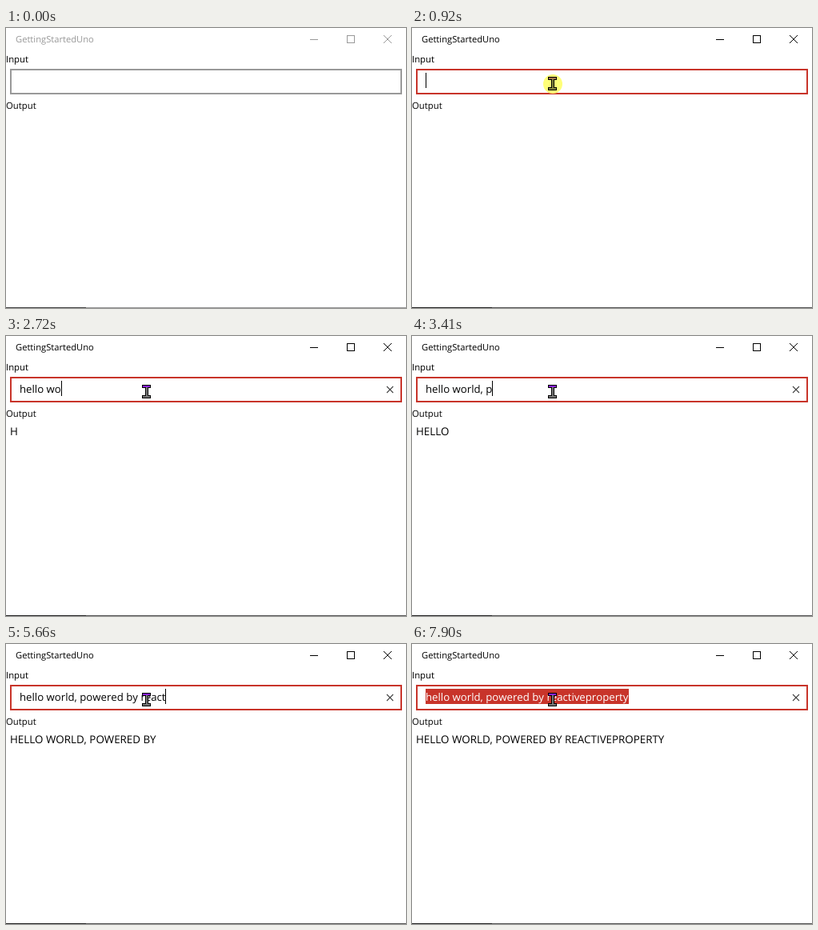
Recreate the animation shown at these times as an HTML page with a canvas. Size 500 by 350 pixels, loop 8000 ms.

```html
<!DOCTYPE html>
<html lang="en">
<head>
<meta charset="utf-8">
<title>GettingStartedUno</title>
<style>
  html, body { margin: 0; width: 100%; height: 100%; overflow: hidden; background: #fff; }
  canvas { display: block; width: 500px; height: 350px; }
</style>
</head>
<body>
<canvas id="stage" width="500" height="350"></canvas>
<script>
const ctx = document.getElementById('stage').getContext('2d');
const LOOP = 8000;
const MESSAGE = 'hello world, powered by reactiveproperty';
const ACCENT = '#c8342a';
const FAMILY = '"Open Sans", "Noto Sans", sans-serif';

// Moments in ms
const MOVE_START = 140, MOVE_STEP = 76.6, MOVE_STEPS = 6;
const FOCUS = 920, CLICK_END = 1070, SELECT_ALL = 7280;
const ECHO_DELAY = 1010;

// Typing rhythm: [letter index, ms], an even pace in between
const RHYTHM = [[0, 1700], [6, 2550], [13, 3410], [19, 4250], [22, 4645], [28, 5580], [32, 6115], [39, 6885]];

function typedAt(t) {
  if (t < RHYTHM[0][1]) return '';
  const next = RHYTHM.findIndex(([, time]) => time > t);
  if (next < 0) return MESSAGE;
  const [i0, t0] = RHYTHM[next - 1], [i1, t1] = RHYTHM[next];
  const index = i0 + (i1 - i0) * (t - t0) / (t1 - t0);
  return MESSAGE.slice(0, Math.floor(index + 1e-6) + 1);
}

function rect(color, x, y, w, h) {
  ctx.fillStyle = color;
  ctx.fillRect(x, y, w, h);
}

function label(str, x, y, size, color = '#000') {
  ctx.font = `${size}px ${FAMILY}`;
  ctx.fillStyle = color;
  ctx.fillText(str, x, y);
}

function cross(x, y, r, color, width) {
  ctx.strokeStyle = color;
  ctx.lineWidth = width;
  ctx.beginPath();
  ctx.moveTo(x - r, y - r); ctx.lineTo(x + r, y + r);
  ctx.moveTo(x + r, y - r); ctx.lineTo(x - r, y + r);
  ctx.stroke();
}

function drawWindow(focused) {
  const ink = focused ? '#000' : '#999';
  rect('#fff', 0, 0, 500, 350);
  label('GettingStartedUno', 12, 18, 11.2, ink);
  rect(ink, 380, 14, 10, 1);
  ctx.strokeStyle = ink;
  ctx.lineWidth = 1;
  ctx.strokeRect(426.5, 9.5, 9, 9);
  cross(477, 14, 5, ink, 1);
  rect(focused ? '#555' : '#999', 0, 349, 500, 1);
  rect(focused ? '#222' : '#444', 0, 349, 100, 1);
  label('Input', 0, 43, 11.3);
  label('Output', 0, 101, 11.35);
}

function drawField(t, hovered) {
  const focused = t >= FOCUS;
  ctx.strokeStyle = focused ? ACCENT : hovered ? '#666' : '#999';
  ctx.lineWidth = 2;
  ctx.strokeRect(6, 52, 488, 30);
  if (!focused) return;

  const str = typedAt(t);
  const selected = t >= SELECT_ALL;
  ctx.font = `13.2px ${FAMILY}`;
  const end = 17 + Math.round(ctx.measureText(str).width);
  if (selected) rect(ACCENT, 17, 56, end - 17 + 1, 19);
  label(str, 17, 71, 13.2, selected ? '#fff' : '#000');
  if (!selected) rect('#000', end, 56, 1, 19);
  if (str) cross(480, 67, 4, '#444', 1.1);
}

function drawArrow(x, y) {
  const outline = [[0, 0], [0, 16], [4, 12.5], [6.5, 18.5], [9, 17.5], [6.5, 11.5], [11.5, 11.5]];
  ctx.beginPath();
  for (const [dx, dy] of outline) ctx.lineTo(x + dx + .5, y + dy + .5);
  ctx.closePath();
  ctx.fillStyle = '#fff';
  ctx.fill();
  ctx.strokeStyle = '#000';
  ctx.lineWidth = 1;
  ctx.stroke();
}

function drawBeam(x, y, clicking) {
  if (clicking) {
    ctx.fillStyle = '#ffff78';
    ctx.beginPath();
    ctx.arc(x + 1, y, 12, 0, Math.PI * 2);
    ctx.fill();
  }
  const core = clicking ? '#85853c' : '#777';
  rect('#000', x - 5, y - 9, 11, 4);
  rect('#000', x - 1, y - 9, 4, 17);
  rect('#000', x - 5, y + 4, 11, 4);
  rect(clicking ? '#a67848' : '#8a22d8', x - 4, y - 8, 9, 2);
  rect(core, x, y - 6, 2, 11);
  rect(core, x - 4, y + 5, 9, 2);
}

function pointerAt(t) {
  if (t < MOVE_START) return null;
  const step = Math.min(MOVE_STEPS, Math.floor((t - MOVE_START) / MOVE_STEP));
  const left = (1 - step / MOVE_STEPS) ** 2;
  return { x: Math.round(175 + 199 * left), y: Math.round(70 + 184 * left) };
}

function draw(t) {
  const pointer = pointerAt(t);
  const hovered = pointer !== null && pointer.y < 83;
  drawWindow(t >= FOCUS);
  drawField(t, hovered);
  label(typedAt(t - ECHO_DELAY).toUpperCase(), 5, 124, 13.35);
  if (hovered) drawBeam(pointer.x, pointer.y, t >= FOCUS && t < CLICK_END);
  else if (pointer) drawArrow(pointer.x, pointer.y);
}

ctx.fontKerning = 'none';
ctx.textRendering = 'geometricPrecision';
const start = performance.now();
function tick() {
  draw((performance.now() - start) % LOOP);
  requestAnimationFrame(tick);
}
tick();
</script>
</body>
</html>
```
